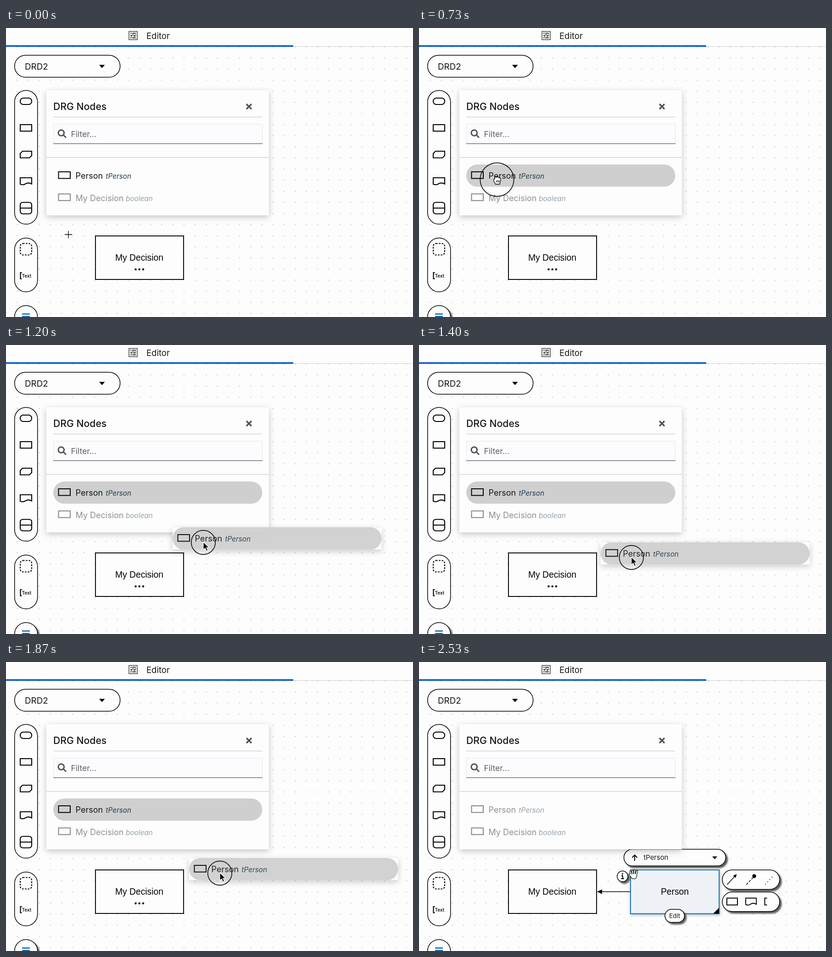
An HTML page that plays this animation: 887 px wide and 631 px high, repeating every 2600 ms.

```html
<!DOCTYPE html>
<html lang="en">
<head>
<meta charset="utf-8">
<title>Decision diagram editor</title>
<style>
  html, body { margin: 0; width: 100%; height: 100%; overflow: hidden; background: #fdfdfd; }
  svg { display: block; width: 100%; height: 100%; }
  text { font-family: Inter, "Open Sans", sans-serif; font-size: 18px; fill: #151515; }
  .node { font-family: "Liberation Sans", Arial, sans-serif; font-size: 19.3px; text-anchor: middle; fill: #000; }
  .type { font-size: 15.3px; font-style: italic; fill: #1d3c4f; }
  .pill { fill: #fdfdfd; stroke: #000; stroke-width: 1.5; }
  .icon { fill: none; stroke: #000; stroke-width: 2; }
  .float { filter: drop-shadow(4px 4px 1.5px rgba(0, 0, 0, .62)); }
  .card { filter: drop-shadow(0 4px 7px rgba(0, 0, 0, .22)); }
  .off { opacity: .47; }
</style>
</head>
<body>
<svg viewBox="0 0 887 631" preserveAspectRatio="none">
  <defs>
    <pattern id="dots" x="60.6" y="53.4" width="24.25" height="24.25" patternUnits="userSpaceOnUse">
      <circle cx="12.1" cy="12.1" r=".75" fill="#777"/>
    </pattern>
    <path id="doc" d="M0 0H25V13.5C18 9.5 14 11.5 11 13.5C7 16 3 15.5 0 14Z"/>
    <g id="person">
      <rect class="icon" x="11.5" y="16" width="25.5" height="14.5"/>
      <text x="48.5" y="31">Person</text>
      <text class="type" x="114.5" y="31">tPerson</text>
    </g>
  </defs>

  <rect width="887" height="631" fill="#fdfdfd"/>
  <rect y="41" width="887" height="590" fill="url(#dots)"/>

  <!-- header -->
  <rect width="887" height="40" fill="#fdfdfd"/>
  <path d="M626 40.5H887" stroke="#cfcfcf"/>
  <rect y="37.5" width="626" height="3.7" fill="#0b5fc6"/>
  <g fill="none" stroke="#333" stroke-width="1.4">
    <rect x="268" y="7.5" width="18" height="18"/>
    <path d="M271 11.5h2.5m1.5 0h8M271 16.5h5m1.5 0h5.5M271 21.5h2.5m1.5 0h8" stroke-width="2.2"/>
    <path d="M274.5 14h4m3 0h2M272 19h3m3 0h4" stroke-width="1"/>
  </g>
  <text x="306" y="23.5" style="font-size:18.5px">Editor</text>

  <!-- diagram -->
  <rect x="195" y="454" width="192" height="95" fill="#fdfdfd" stroke="#000" stroke-width="1.9"/>
  <text class="node" x="290.5" y="508">My Decision</text>
  <g id="more"><circle cx="282.5" cy="527" r="2.2"/><circle cx="290.7" cy="527" r="2.2"/><circle cx="299" cy="527" r="2.2"/></g>

  <g id="dropped">
    <path d="M461 501.5H396" stroke="#000" stroke-width="1.5"/>
    <path d="M388 501.5L399 496.5V506.5Z"/>
    <rect x="461" y="454" width="193" height="95.5" fill="#eef2f7" stroke="#0b6a99" stroke-width="1.8" style="filter:drop-shadow(1px 2px 3px rgba(0,70,120,.4))"/>
    <path d="M654 536.5V549.5H641Z"/>
    <text class="node" x="557.5" y="508">Person</text>
    <g class="float">
      <rect class="pill" x="446.5" y="408.8" width="222" height="36.5" rx="18.2"/>
      <circle class="pill" cx="443.5" cy="468" r="11.7"/>
      <rect class="pill" x="536" y="540" width="42.5" height="28.5" rx="14.2"/>
      <rect class="pill" x="661" y="454" width="125" height="42.5" rx="21.2"/>
      <rect class="pill" x="661" y="502.3" width="125" height="42.5" rx="21.2"/>
    </g>
    <path class="icon" d="M470 434V421.5M464.5 427L470 421.5L475.5 427" stroke-width="2.2"/>
    <text x="489.5" y="432" style="font-size:14.8px">tPerson</text>
    <path d="M639 424.5H650L644.5 430.5Z"/>
    <path class="icon" d="M441 466.5H443.8V473M440.5 473H447"/>
    <circle cx="443.4" cy="462.5" r="1.6"/>
    <text x="557.2" y="559" text-anchor="middle" style="font-size:13.3px">Edit</text>
    <g fill="none" stroke="#000" stroke-width="1.5">
      <path d="M671.5 486L688 468"/>
      <path d="M713.5 486L730 468.5" stroke-dasharray="5 3"/>
      <path d="M754.5 485.5L772 467" stroke-dasharray="1.8 5"/>
    </g>
    <path d="M692.5 463L690 471.5L684.5 466.5Z"/>
    <circle cx="730.5" cy="467.5" r="4.2"/>
    <rect class="icon" x="671" y="515.5" width="23" height="15"/>
    <use href="#doc" class="icon" transform="translate(712 515.5) scale(.93 1)"/>
    <path class="icon" d="M758.5 515.5H753.5V530.5H758.5"/>
  </g>

  <!-- left controls -->
  <rect class="pill" x="18.7" y="59.5" width="230" height="48" rx="24"/>
  <text x="41" y="90.5" style="font-size:18.8px">DRD2</text>
  <path d="M203 80.5H215.5L209.2 87.5Z"/>
  <rect class="pill" x="18.7" y="136.3" width="50" height="292" rx="25"/>
  <rect class="pill" x="18.7" y="458.5" width="50" height="117.5" rx="25"/>
  <rect id="last" class="pill" x="18.7" y="606" width="50" height="90" rx="25"/>
  <g class="icon" style="stroke-width:2.1">
    <rect x="31" y="153" width="25" height="14" rx="6.5"/>
    <rect x="31" y="211" width="25" height="14.2"/>
    <path d="M36 269H56V278.5L51 283.5H31V274Z"/>
    <use href="#doc" x="31" y="327"/>
    <rect x="31" y="380.7" width="25" height="25" rx="5.5"/>
    <path d="M31 393.2H56"/>
    <rect x="31" y="470.5" width="25" height="25" rx="6" stroke-dasharray="3.6 2.6"/>
    <path d="M34.5 534H31.5V547.5H34.5"/>
    <path d="M35 624.5H52M35 630H52" stroke="#0b5f9f" stroke-width="2.4"/>
  </g>
  <text x="34.5" y="545" style="font-size:10px;font-weight:600">Text</text>

  <!-- node list -->
  <rect class="card" x="88" y="136" width="485" height="273" fill="#fdfdfd"/>
  <text x="103" y="178.5" style="font-size:21.2px;font-weight:500">DRG Nodes</text>
  <path d="M524 166L535 177M535 166L524 177" stroke="#4f5255" stroke-width="3.2"/>
  <path d="M103 194.3H558.5M88 282.7H573" stroke="#cacad4" stroke-width="1.3"/>
  <rect x="103.5" y="210" width="455" height="42.5" fill="#fcfcfe" stroke="#e5e5ee"/>
  <path d="M103 252.5H559" stroke="#6a6e73" stroke-width="1.3"/>
  <g fill="none" stroke="#4f5255" stroke-width="3">
    <circle cx="120.3" cy="229" r="6.3"/><path d="M125 233.5L131 239.5"/>
  </g>
  <text x="141.5" y="238" style="font-size:17.5px;fill:#5c6064">Filter...</text>
  <rect id="hover" x="103" y="298" width="455.5" height="48.5" rx="24.2" fill="#cfcfcf"/>
  <use id="row" href="#person" x="103" y="298"/>
  <g class="off">
    <rect class="icon" x="114.5" y="362.3" width="25.5" height="14.5"/>
    <text x="151.5" y="377.5">My Decision</text>
    <text class="type" x="261" y="377.5">boolean</text>
  </g>

  <!-- drag preview -->
  <g id="drag" opacity=".93">
    <g class="card">
      <rect width="455.5" height="48.5" fill="#fdfdfd"/>
      <rect width="455.5" height="48.5" rx="24.2" fill="#cfcfcf"/>
    </g>
    <use href="#person"/>
  </g>

  <!-- pointer -->
  <g id="pointer">
    <circle id="ring" fill="none" stroke="#111" stroke-width="1.7"/>
    <path id="cross" d="M-8 0H8M0 -8V8" stroke="#000" stroke-width="1.3"/>
    <path id="arrow" d="M0 -1V16L4 12.5L6.8 18.8L9.8 17.5L7 11.3H12.3Z" fill="#000" stroke="#fff" stroke-width="1.2"/>
    <g id="open" stroke-linecap="round" stroke-linejoin="round"></g>
    <g id="fist" fill="#fff" stroke="#000" stroke-width="1.3" stroke-linejoin="round">
      <path d="M-5 -3C-4.5 -6.5 -2 -6.5 -1.3 -4.8C-.5 -7 2 -6.5 2.4 -4.6C3.5 -6 5.4 -5.5 5.4 -3.4C7 -4 8.2 -3 8 -1C8 4 6.5 6 5.8 10H-3.5C-4 7 -7.5 4 -7.5 1C-7.5 -1.5 -6 -1.5 -5 -1Z"/>
      <path d="M-1.2 1.5V6M1.8 1.5V6M4.6 1.5V6"/>
    </g>
  </g>
</svg>
<script>
  const LOOP = 2600, STEP = 200 / 3;
  const HOVER = 400, PRESS = 730, DRAG = 850, DROP = 2325;
  const $ = id => document.getElementById(id);
  const show = (id, on) => { $(id).style.display = on ? '' : 'none'; };

  // time, x, y of the pointer
  const path = [
    [70, 136, 451], [600, 170, 331], [800, 170, 331], [900, 270, 364],
    [1000, 365, 402], [1130, 430, 431], [1200, 430, 431],
    [1530, 480, 481], [1870, 466, 461], [DROP, 468, 463]
  ];

  const slope = (i, c) => (path[i + 1][c] - path[i][c]) / (path[i + 1][0] - path[i][0]);
  function tangent(i, c) {
    if (i === 0 || i === path.length - 1) return 0;
    const a = slope(i - 1, c), b = slope(i, c);
    return a * b > 0 ? 2 * a * b / (a + b) : 0;
  }
  // monotone cubic through the path points
  function along(t, c) {
    const n = path.length - 1;
    if (t <= path[0][0]) return path[0][c];
    if (t >= path[n][0]) return path[n][c];
    let i = 0;
    while (t > path[i + 1][0]) i++;
    const [p, q] = [path[i], path[i + 1]], h = q[0] - p[0], u = (t - p[0]) / h;
    const e = u * u * (3 - 2 * u);
    return p[c] + (q[c] - p[c]) * e
      + h * u * (1 - u) * ((1 - u) * tangent(i, c) - u * tangent(i + 1, c));
  }

  const hand = 'M-5 2L-7 -5M-1.8 1L-2.6 -7.5M1.8 1L2 -8M5 2L7 -6M-5 5L-8.5 .5'
    + 'M-5 2L-1.8 1H1.8L5 2V5L3 8.5H-2.5L-5 5Z';
  $('open').innerHTML = [['#000', 4.4], ['#fff', 2.2]]
    .map(([c, w]) => `<path d="${hand}" fill="${c}" stroke="${c}" stroke-width="${w}"/>`).join('');

  function draw(now) {
    const t = Math.floor((now % LOOP + 3.4) / STEP) * STEP;
    const x = along(t, 1), y = along(t, 2);
    const held = t >= PRESS && t < DROP, dragging = t >= DRAG && t < DROP, done = t >= DROP;
    const hovered = t >= HOVER && !done;

    show('hover', hovered);
    show('drag', dragging);
    show('dropped', done);
    show('more', !done);
    $('row').setAttribute('class', done ? 'off' : '');
    $('last').setAttribute('class', hovered ? 'pill float' : 'pill');

    const lag = t < 1100 ? 24 : 0;
    $('drag').setAttribute('transform', `translate(${along(t - lag, 1) - 67} ${along(t - lag, 2) - 33})`);

    const shape = done ? 'open' : dragging ? 'arrow' : held ? 'fist'
      : hovered ? 'open' : y > 409 ? 'cross' : 'arrow';
    for (const id of ['cross', 'arrow', 'open', 'fist']) show(id, id === shape);
    show('ring', held);
    $('ring').setAttribute('r', Math.max(26.3, 37 - Math.max(0, t - PRESS) * .09));
    $('pointer').setAttribute('transform', `translate(${x} ${y})`);
  }

  let start;
  function tick(now) {
    start ??= now;
    draw(now - start);
    requestAnimationFrame(tick);
  }
  draw(0);
  requestAnimationFrame(tick);
</script>
</body>
</html>
```
